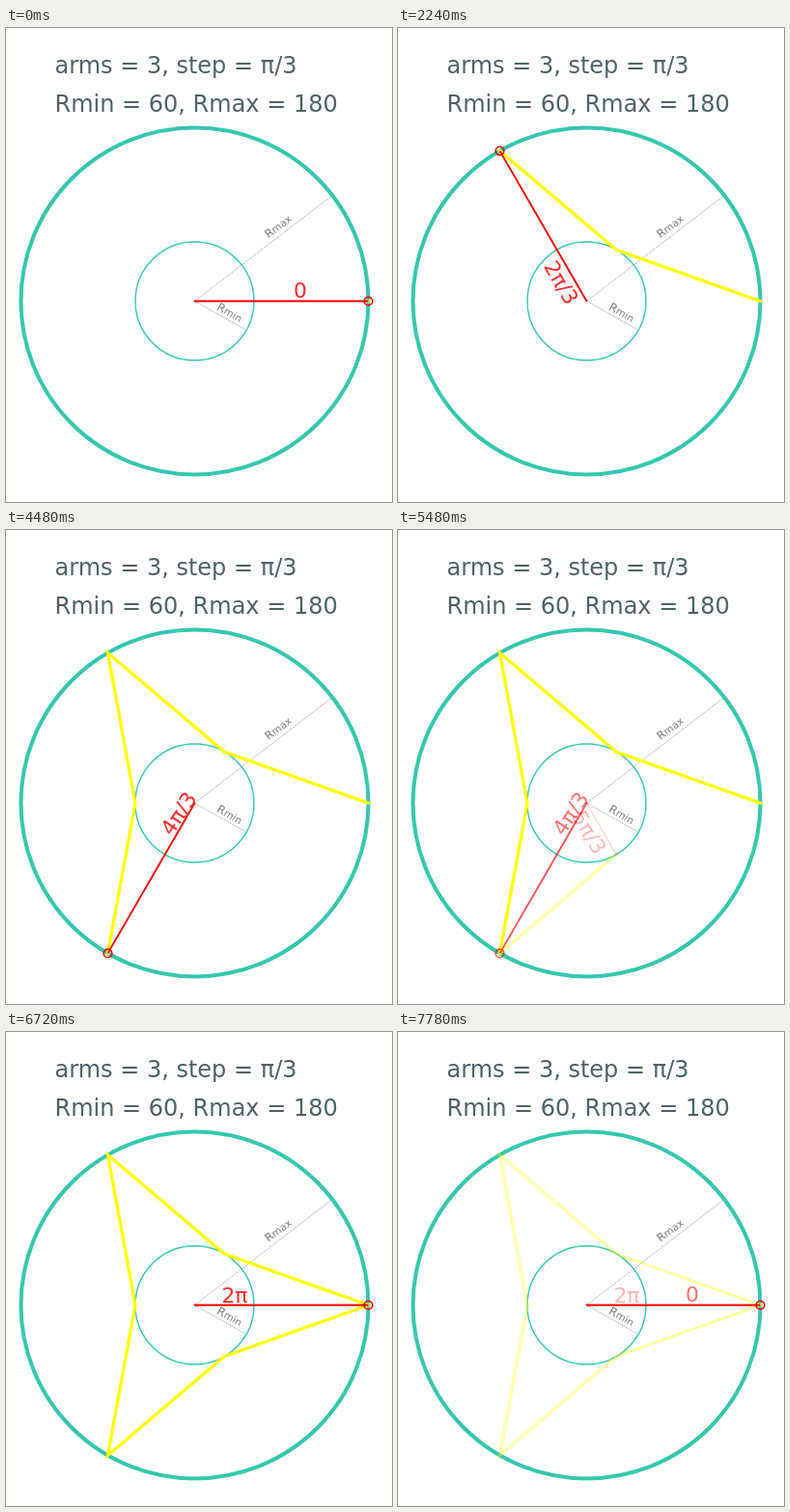
Animation of 400x492 px, one loop 7.84 s. Source, as an HTML page:

```html
<!DOCTYPE html>
<html>
<head>
<meta charset="utf-8">
<style>
html, body { margin: 0; height: 100%; overflow: hidden; background: #fff; }
svg { display: block; font-family: "DejaVu Sans", sans-serif; }
</style>
</head>
<body>
<svg id="stage" width="400" height="492" fill="none"></svg>
<script>
const CX = 195.5, CY = 283.5, RMIN = 61.5, RMAX = 180;
const HOLD = 1000, TICK = 60, STEP = HOLD + 2 * TICK;

// label, its centre, its tilt in degrees
const labels = [
  ["0", 305, 272, 0],
  ["π/3", 198, 243.5, 0],
  ["2π/3", 169.5, 264, 60],
  ["π", 165, 273, 0],
  ["4π/3", 178.5, 294, -56],
  ["5π/3", 198.5, 313.5, 60],
  ["2π", 237, 273, 0]
];

const node = i => {
  const r = i % 2 ? RMIN : RMAX, a = i * Math.PI / 3;
  return [CX + r * Math.cos(a), CY - r * Math.sin(a)];
};

const radius = (name, x, y, tx, ty, tilt) => `
  <path d="M${CX} ${CY}L${x} ${y}" stroke="#888" stroke-width=".8" stroke-dasharray="1.2 1"/>
  <text transform="translate(${tx} ${ty}) rotate(${tilt})" font-size="12" fill="#808080">R<tspan font-size="10.5">${name}</tspan></text>`;

const base = `
  <rect width="400" height="492" fill="#fff"/>
  <g font-size="24" fill="#4f6367">
    <text x="50.5" y="47">arms = 3, step = π/3</text>
    <text x="50.5" y="86.5">Rmin = 60, Rmax = 180</text>
  </g>
  <g stroke="#35c8ad">
    <circle cx="${CX}" cy="${CY}" r="${RMAX}" stroke-width="4"/>
    <circle cx="${CX}" cy="${CY}" r="${RMIN}" stroke-width="1.4"/>
  </g>
  ${radius("max", 337, 174.5, 272, 218.5, -37.6)}
  ${radius("min", 249, 313.5, 217.5, 292, 29.3)}`;

function scene(i) {
  const path = [];
  for (let k = 0; k <= i; k++) path.push(node(k));
  if (!i) path.push([path[0][0] - .1, CY]);
  const [x, y] = node(i), [text, tx, ty, tilt] = labels[i];
  const s = i % 2 ? RMIN / RMAX : 1;
  return `<g>${base}
    <polyline points="${path.join(" ")}" stroke="#ff0" stroke-width="3.3" stroke-linecap="square"/>
    <g stroke="#f00000" stroke-width="${1.8 * s + .1}">
      <path d="M${CX} ${CY}L${x} ${y}"/>
      <circle cx="${x}" cy="${y}" r="${4.3 * s}" stroke-width="${1.5 * s + .1}"/>
    </g>
    <circle cx="${CX}" cy="${CY}" r=".9" fill="#a02020"/>
    <text transform="translate(${tx} ${ty}) rotate(${tilt})" y="8" font-size="21.8" text-anchor="middle" fill="#ff2a2a">${text}</text>
  </g>`;
}

const stage = document.getElementById("stage");
stage.innerHTML = labels.map((_, i) => scene(i)).join("") + scene(0);
const scenes = [...stage.children];

function draw() {
  const t = performance.now() % (STEP * labels.length);
  const i = Math.floor(t / STEP), rest = t % STEP;
  const mix = rest < HOLD ? 0 : (1 + Math.floor((rest - HOLD) / TICK)) / 3;
  scenes.forEach((g, k) => {
    const alpha = k === i ? 1 : k === i + 1 ? mix : 0;
    g.style.display = alpha ? "" : "none";
    g.style.opacity = alpha;
  });
  requestAnimationFrame(draw);
}
draw();
</script>
</body>
</html>
```
